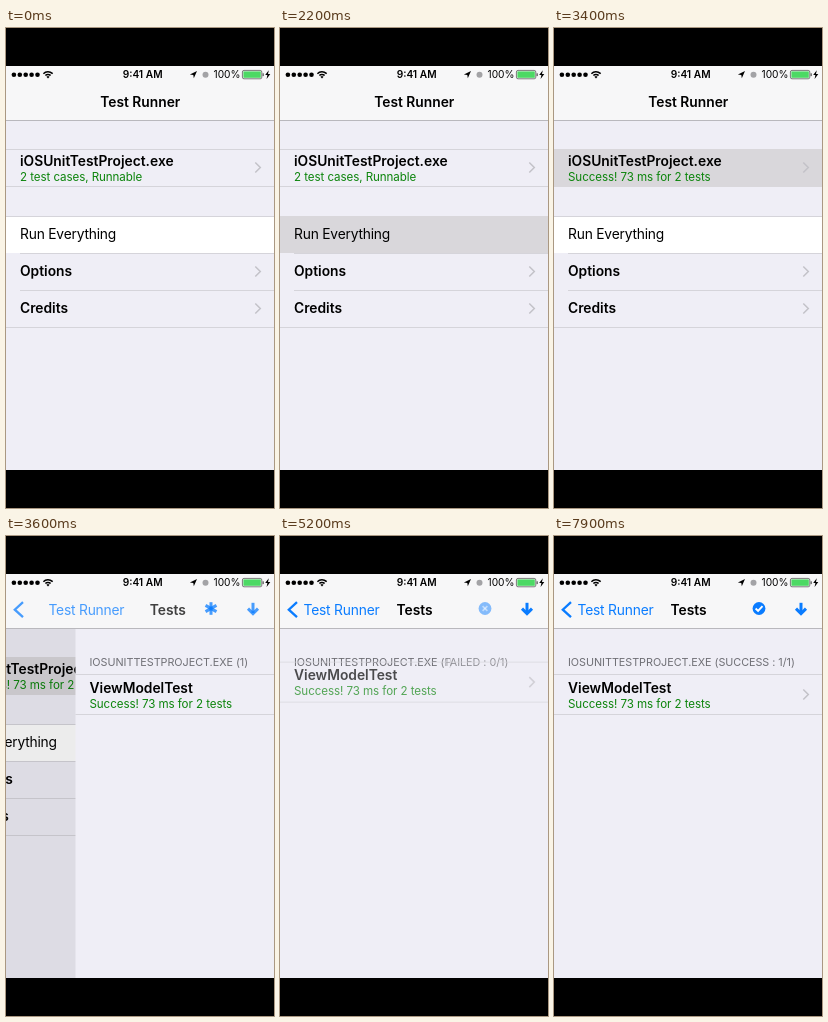
Animation of 268x480 px, one loop 8000 ms. Source, as an HTML page with a canvas:

```html
<!DOCTYPE html>
<html lang="en">
<head>
<meta charset="utf-8">
<title>Test Runner</title>
<style>
html, body { margin: 0; width: 100%; height: 100%; overflow: hidden; background: #000; }
canvas { display: block; width: 268px; height: 480px; }
</style>
</head>
<body>
<canvas id="stage"></canvas>
<script>
const W = 268, H = 480, LOOP = 8000;
const TOP = 38, LIST = 92, BOTTOM = 442;
const BG = '#efeef6', BAR = '#f7f7f8', LINE = '#d5d4da', BLUE = '#0a7cff', GREEN = '#0b840b', PRESSED = '#d9d7db';
const canvas = document.getElementById('stage');
const ctx = canvas.getContext('2d');
const dpr = window.devicePixelRatio || 1;
canvas.width = W * dpr;
canvas.height = H * dpr;

const clamp = v => Math.max(0, Math.min(1, v));
const ramp = (t, start, length) => clamp((t - start) / length);
const ease = p => p * p * (3 - 2 * p);
const mix = (a, b, p) => a + (b - a) * p;

// Times of the filter taps; each list reload follows its tap
const PUSH = 3450, HOLD = 190, ROW_FADE = 300, LABEL_FADE = 170;
const FILTERS = [
  { tap: 0, icon: '*', label: '(1)', row: 1 },
  { tap: 4900, icon: 'x', label: '(FAILED : 0/1)', row: 0 },
  { tap: 5900, icon: '?', label: '(IGNORED : 0/1)', row: 0 },
  { tap: 7100, icon: 'v', label: '(SUCCESS : 1/1)', row: 1 }
];

function rect(x, y, w, h, color) {
  ctx.fillStyle = color;
  ctx.fillRect(x, y, w, h);
}

function path(points, color, width) {
  ctx.beginPath();
  points.forEach(([x, y]) => ctx.lineTo(x, y));
  if (width) {
    ctx.strokeStyle = color;
    ctx.lineWidth = width;
    ctx.stroke();
  } else {
    ctx.fillStyle = color;
    ctx.fill();
  }
}

function disc(x, y, r, color) {
  ctx.beginPath();
  ctx.arc(x, y, r, 0, 7);
  ctx.fillStyle = color;
  ctx.fill();
}

function text(s, x, y, size, { weight = 400, color = '#000', align = 'left', gap = 0 } = {}) {
  ctx.font = `${weight} ${size}px Inter, sans-serif`;
  ctx.letterSpacing = gap + 'px';
  ctx.textAlign = align;
  ctx.fillStyle = color;
  ctx.fillText(s, x, y);
  return ctx.measureText(s).width;
}

const body = (s, x, y, options) => text(s, x, y, 13.8, { gap: -0.2, ...options });
const bold = (s, x, y, options) => text(s, x, y, 13.8, { weight: 600, ...options });
const detail = (s, y) => text(s, 14, y, 11.6, { color: GREEN, gap: -0.08 });

function faded(alpha, draw) {
  if (alpha <= 0) return;
  ctx.save();
  ctx.globalAlpha *= alpha;
  draw();
  ctx.restore();
}

function shifted(x, y, draw) {
  ctx.save();
  ctx.translate(x, y);
  draw();
  ctx.restore();
}

const disclosure = y => path([[249.3, y - 5], [254.3, y], [249.3, y + 5]], '#c3c2c8', 1.5);

function home(t) {
  rect(0, LIST, W, BOTTOM - LIST, BG);
  rect(0, 189, W, 36, '#fff');
  [[0, 121], [0, 158], [0, 188], [14, 225], [14, 262], [0, 299]]
    .forEach(([x, y]) => rect(x, y, W - x, 1, LINE));
  if (t >= 2000) faded(1 - ease(ramp(t, 2300, 350)), () => rect(0, 188, W, 37, PRESSED));
  if (t >= 3200) rect(0, 121, W, 38, PRESSED);

  bold('iOSUnitTestProject.exe', 14, 137.5);
  detail(t < 2300 ? '2 test cases, Runnable' : 'Success! 73 ms for 2 tests', 152.8);
  body('Run Everything', 14, 211.4);
  bold('Options', 14, 248.4);
  bold('Credits', 14, 285.4);
  [139.5, 243.5, 280.5].forEach(disclosure);
}

function testRow() {
  rect(0, 138, W, 1, LINE);
  rect(0, 178, W, 1, LINE);
  bold('ViewModelTest', 14, 156.6);
  detail('Success! 73 ms for 2 tests', 171.8);
  disclosure(158.5);
}

function tests(from, to, labelMix, rowMix) {
  rect(0, LIST, W, BOTTOM - LIST, BG);
  const style = { color: '#6f6f75', gap: -0.03 };
  const label = (s, x) => text(s, x, 130.1, 10.8, style);
  const x = 14 + label('IOSUNITTESTPROJECT.EXE ', 14);
  faded(1 - labelMix, () => label(from.label, x));
  faded(labelMix, () => label(to.label, x));
  const shown = mix(from.row, to.row, rowMix);
  faded(shown, () => shifted(0, -40 * (1 - shown), testRow));
}

function filterIcon(kind) {
  const x = 205, y = 72.5;
  if (kind === '*') {
    for (let i = 0; i < 3; i++) {
      const a = Math.PI / 2 + i * Math.PI / 3, dx = 6.3 * Math.cos(a), dy = 6.3 * Math.sin(a);
      path([[x - dx, y - dy], [x + dx, y + dy]], BLUE, 3);
    }
    return;
  }
  disc(x, y, 6.4, BLUE);
  if (kind === 'x') {
    path([[x - 2.4, y - 2.4], [x + 2.4, y + 2.4]], '#fff', 1.7);
    path([[x + 2.4, y - 2.4], [x - 2.4, y + 2.4]], '#fff', 1.7);
  } else if (kind === '?') {
    text('?', x, y + 3.6, 10, { weight: 800, color: '#fff', align: 'center' });
  } else {
    path([[x - 3.4, y], [x - 0.9, y + 2.5], [x + 3.5, y - 2.3]], '#fff', 1.9);
  }
}

function navBar(q, icon, iconAlpha) {
  rect(0, TOP, W, LIST - TOP, BAR);
  rect(0, LIST, W, 1, '#b9b8bd');
  const back = mix(134.3, 61.5, q), baseline = 78.8;
  faded(1 - q * 1.6, () => bold('Test Runner', back, baseline, { align: 'center' }));
  faded(q, () => {
    body('Test Runner', back, baseline, { color: BLUE, align: 'center' });
    path([[17, 66.2], [8.8, 73.7], [17, 81.2]], BLUE, 2.3);
    bold('Tests', mix(240, 134.5, q), baseline, { align: 'center' });
    path([[247, 66.8], [247, 77]], BLUE, 3);
    path([[242, 72.6], [247, 77.6], [252, 72.6]], BLUE, 3);
    faded(iconAlpha, () => filterIcon(icon));
  });
}

function statusBar() {
  for (let i = 0; i < 5; i++) disc(7.9 + 5.9 * i, 46.7, 2.3, '#000');
  ctx.strokeStyle = '#000';
  ctx.lineWidth = 1.5;
  [3.6, 6.3].forEach(r => {
    ctx.beginPath();
    ctx.arc(42, 50, r, -Math.PI * 0.76, -Math.PI * 0.24);
    ctx.stroke();
  });
  path([[42, 50.6], [40.4, 48.7], [42, 48], [43.6, 48.7]], '#000');

  text('9:41 AM', 136.6, 50.3, 10.2, { weight: 600, align: 'center' });
  path([[191, 43], [187.8, 50.3], [187.3, 46.9], [183.9, 46.4]], '#000');
  disc(199.5, 46.7, 3, '#a3a3a6');
  text('100%', 234.5, 50.3, 10.2, { align: 'right' });

  ctx.beginPath();
  ctx.roundRect(236.4, 42.4, 19.4, 8.4, 1.6);
  ctx.strokeStyle = '#444';
  ctx.lineWidth = 0.7;
  ctx.stroke();
  rect(237.4, 43.4, 17.4, 6.4, '#4cd964');
  rect(256.6, 45.3, 1.1, 2.8, '#444');
  path([[262.8, 42.3], [259.2, 47.1], [261.4, 47.1], [260.6, 51], [264.3, 45.9], [262, 45.9]], '#000');
}

function draw(t) {
  ctx.setTransform(dpr, 0, 0, dpr, 0, 0);
  rect(0, 0, W, H, '#000');

  // Critically damped spring for the screen push
  const s = Math.max(0, t - PUSH) * 0.0175;
  const q = 1 - (1 + s) * Math.exp(-s);

  let index = 0;
  FILTERS.forEach((f, i) => { if (i && t >= f.tap) index = i; });
  const to = FILTERS[index], from = FILTERS[Math.max(0, index - 1)];
  const reload = to.tap + HOLD;
  const fade = length => index ? ease(ramp(t, reload, length)) : 1;
  const icon = t < reload ? from.icon : to.icon;
  const iconAlpha = index ? mix(0.3, 1, ramp(t, reload, 420)) : 1;

  ctx.save();
  ctx.beginPath();
  ctx.rect(0, TOP, W, BOTTOM - TOP);
  ctx.clip();
  if (q < 0.9995) {
    shifted(-80 * q, 0, () => home(t));
    faded(0.1 * q, () => rect(0, LIST, W, BOTTOM - LIST, '#000'));
  }
  if (q > 0) {
    shifted(q < 0.9995 ? W * (1 - q) : 0, 0,
      () => tests(from, to, fade(LABEL_FADE), fade(ROW_FADE)));
  }
  navBar(q, icon, iconAlpha);
  statusBar();
  ctx.restore();
}

const begin = performance.now();
function tick() {
  draw((performance.now() - begin) % LOOP);
  requestAnimationFrame(tick);
}
tick();
</script>
</body>
</html>
```
